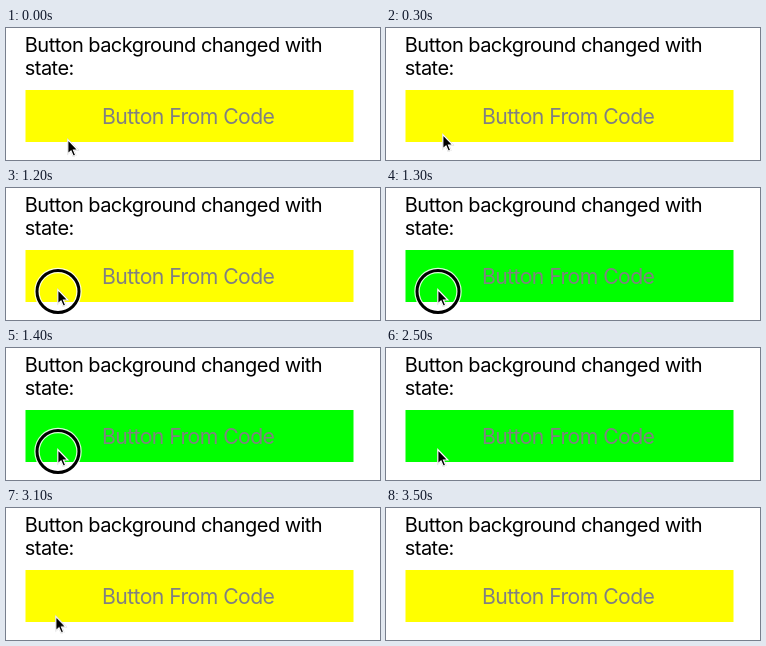
These frames come from a looping animation (374 px wide and 132 px high, 4600 ms). An HTML page:

```html
<!DOCTYPE html>
<html lang="en">
<head>
<meta charset="utf-8">
<title>Button state</title>
<style>
html, body { margin: 0; width: 100%; height: 100%; overflow: hidden; background: #fff; }
svg { display: block; width: 374px; height: 132px; overflow: hidden; }
text { font-family: Inter, Roboto, "Liberation Sans", sans-serif; font-optical-sizing: none; }
.title { font-size: 20px; letter-spacing: -.54px; fill: #000; }
.label { font-size: 21.2px; letter-spacing: -.56px; fill: #808080; }
.button { fill: #ff0; animation: press 4.6s step-end infinite; }
.ring { fill: none; visibility: hidden; animation: touch 4.6s step-end infinite; }
.halo { stroke: #fff; stroke-width: 5.4; stroke-opacity: .85; }
.line { stroke: #000; stroke-width: 3; }
.cursor { animation: move 4.6s step-end infinite; }
.cursor path { fill: #000; stroke: #fff; stroke-width: 1.2; filter: drop-shadow(0 .8px .7px rgba(0, 0, 0, .35)); }

@keyframes press {
  0%, 56.52%, 100% { fill: #ff0; }
  28.26% { fill: #0f0; }
}
@keyframes touch {
  0%, 54.34%, 100% { visibility: hidden; }
  26.08% { visibility: visible; }
}
/* each step of the pointer lasts 100 ms */
@keyframes move {
  0% { transform: translate(61px, 111px); }
  2.17% { transform: translate(61px, 111px); animation-timing-function: steps(5, jump-both); }
  13.04% { transform: translate(51px, 101px); }
  67.39% { transform: translate(51px, 101px); animation-timing-function: steps(4, jump-both); }
  76.08%, 100% { transform: translate(41px, 135px); }
}
</style>
</head>
<body>
<svg viewBox="0 0 374 132">
  <text class="title" x="18.8" y="23.8">Button background changed with</text>
  <text class="title" x="18.8" y="47.4">state:</text>
  <rect class="button" x="19.5" y="62" width="328" height="52"/>
  <text class="label" x="95.9" y="96">Button From Code</text>
  <g class="ring">
    <circle class="halo" cx="52" cy="103.5" r="21"/>
    <circle class="line" cx="52" cy="103.5" r="21"/>
  </g>
  <g class="cursor">
    <path d="M.8 .5V14.9L4 11.9 6.3 17.2 8.7 16.2 6.5 11H10.9Z"/>
  </g>
</svg>
</body>
</html>
```
